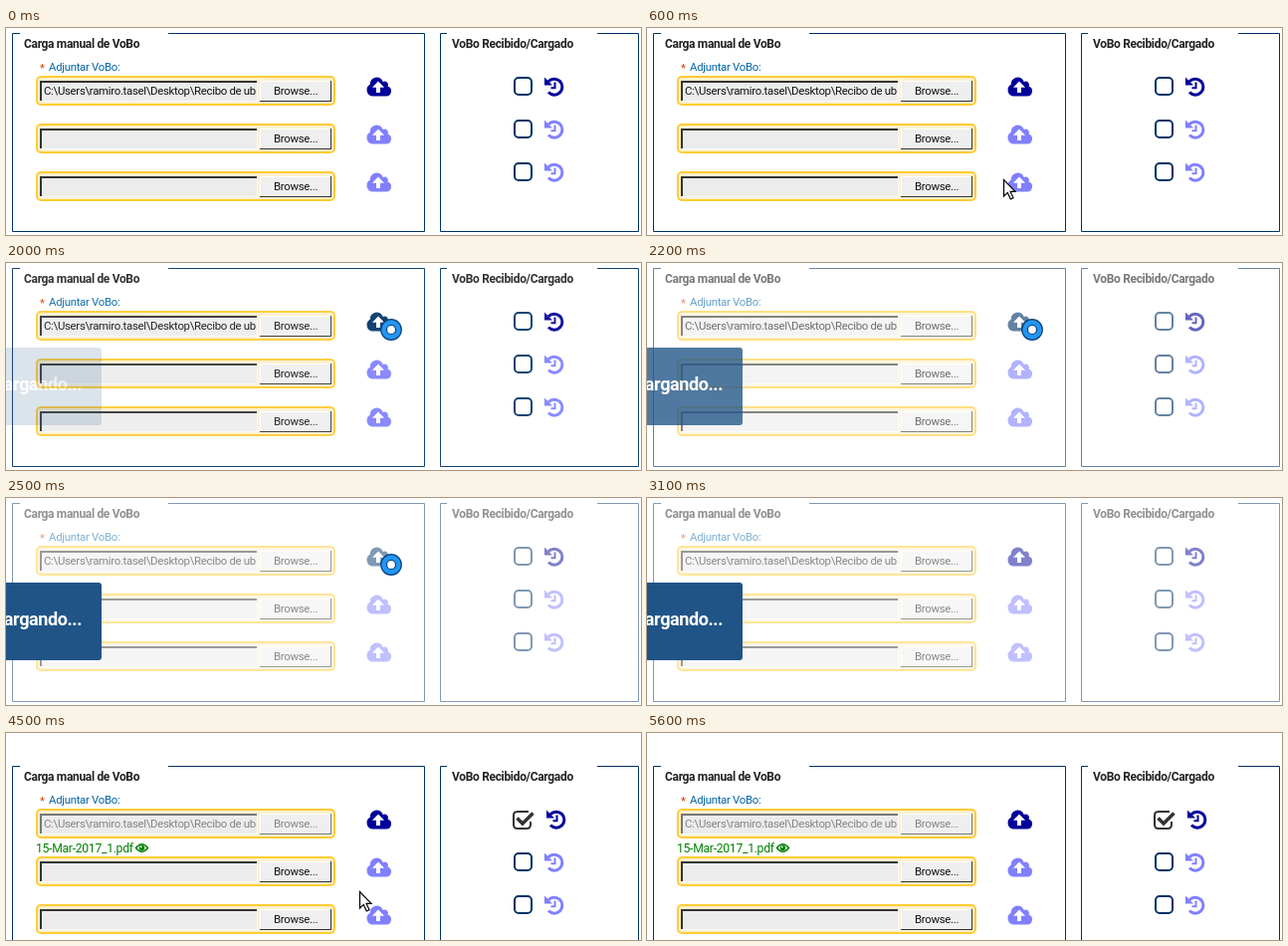
An HTML page for the animation above (5.7 s loop, 638 px wide and 208 px high).

```html
<!DOCTYPE html>
<html lang="es">
<head>
<meta charset="utf-8">
<style>
html, body { margin: 0; width: 100%; height: 100%; overflow: hidden; background: #fff; }
svg { display: block; }
text { font: 11.4px Roboto, sans-serif; letter-spacing: -.3px; }
.title { font-size: 12px; font-weight: bold; letter-spacing: -.33px; fill: #222; }
.file { font-size: 12.2px; fill: #008000; }
.busy { font-size: 18px; font-weight: bold; letter-spacing: -.4px; fill: #fff; }
</style>
</head>
<body>
<svg id="stage" width="638" height="208" viewBox="0 0 638 208"></svg>
<script>
const LOOP = 5700, NAVY = '#036', BLUE = '#000099', PALE = '#8080ff';
const FILE_PATH = String.raw`C:\Users\ramiro.tasel\Desktop\Recibo de ub`;
const stage = document.getElementById('stage');
const clamp = v => Math.max(0, Math.min(1, v));
const at = (x, y, body) => `<g transform="translate(${x} ${y})">${body}</g>`;
const path = (d, fill, stroke = 'none', width = 1) =>
  `<path d="${d}" fill="${fill}" stroke="${stroke}" stroke-width="${width}"/>`;
const rect = (x, y, w, h, fill, extra = '') =>
  `<rect x="${x}" y="${y}" width="${w}" height="${h}" fill="${fill}" ${extra}/>`;
const text = (x, y, str, attrs = '') => `<text x="${x}" y="${y}" ${attrs}>${str}</text>`;

// The top edge is open where the legend sits.
const panel = (left, right, gapStart, gapEnd, title, titleX) =>
  path(`M${gapStart} 5.5H${left}V204.5H${right}V5.5H${gapEnd}`, 'none', NAVY) +
  text(titleX, 20, title, 'class="title"');

function fileRow(y, value, disabled) {
  const ink = disabled ? '#858585' : '#111';
  const edge = disabled ? '#777' : '#333';
  return at(0, y,
    rect(31, 1, 299, 28, '#fdf0d0', 'rx="4" stroke="#fc3" stroke-width="2"') +
    rect(34, 5, 219, 21, '#fafafa') + rect(34, 5, 218, 20, edge) +
    rect(36, 7, 216, 18, '#ececec') +
    `<svg x="36" y="7" width="215" height="18">${text(2, 12, value, `fill="${ink}"`)}</svg>` +
    rect(255, 5, 72, 21, edge) + rect(255, 5, 71, 20, '#fff') +
    rect(256, 6, 70, 19, '#efefef') +
    text(269, 19, 'Browse...', `fill="${ink}"`));
}

const cloud = (y, color) => at(374, y,
  path('M-6 9.5A6.3 6.3 0 0 1-8.3-2.2A6.7 6.7 0 0 1 4.7-5A3.5 3.5 0 0 1 9.6-.4A5.1 5.1 0 0 1 7.6 9.5Z', color) +
  path('M0-5.5L6 .8H2V6H-2V.8H-6Z', '#fff'));

const history = (x, y, color) => at(x, y,
  path('M-6-5.3A8 8 0 1 1-6 5.6', 'none', color, 3) +
  path('M-10-9.5V-1.5H-2Z', color) +
  path('M.5-4.5V1.3H-3.5', 'none', color, 2));

const checkbox = (y, checked) => checked
  ? at(519, y,
      path('M6-8H-5Q-9-8-9-4V5Q-9 9-5 9H4Q8 9 8 5V2', 'none', '#333', 2) +
      path('M-5.5-1.5L0 4L10.5-6.5', 'none', '#333', 3.4))
  : rect(511, y - 9, 17, 17, 'none', `rx="4" stroke="${NAVY}" stroke-width="2"`);

const eye = at(136.5, 115.5,
  path('M-6 0Q0-7.5 6 0Q0 7.5-6 0Z', 'none', '#008000', 1.5) +
  '<circle r="2.8" fill="#008000"/><circle cx="-.8" cy="-1" r=".9" fill="#fff"/>');

function form(done, hover) {
  let out = panel(6.5, 420.5, 14, 163, 'Carga manual de VoBo', 18) +
    panel(436.5, 635.5, 443, 594, 'VoBo Recibido/Cargado', 448) +
    text(34, 44, '*', 'fill="#e23b00"') +
    text(43, 43, 'Adjuntar VoBo:', 'fill="#0064a6"');
  for (let i = 0; i < 3; i++) {
    const first = i === 0, color = first ? BLUE : PALE, y = 59 + 43 * i;
    out += fileRow(48 + 48 * i, first ? FILE_PATH : '', first && done) +
      cloud(59 + 48 * i, first && hover ? NAVY : color) +
      checkbox(y, first && done) +
      history(first && done ? 553 : 551, y, color);
  }
  return at(0, done ? 28 : 0, out) +
    (done ? text(30, 120, '15-Mar-2017_1.pdf', 'class="file"') + eye : '');
}

const ARROW = path('M.5.5V17L4.3 13.4L7.3 20L10 18.8L7.1 12.4H12Z', '#fff', '#000', 1.2);
const HAND = path('M-2 1Q0-2.5 2 1V9Q4 7 5.3 9.6Q7.3 8 8.3 10.7Q10.7 10 10.7 13V18L8.5 24H-1L-6 16Q-8 12.5-5.5 12L-2 14.5Z', '#fff', '#000', 1.3) +
  path('M2 9V13M5.3 10V13.5M8.3 11V14', 'none', '#000');
const RING = '<circle cx="17" cy="12" r="7.4" fill="#fff" stroke="#0b3f78" stroke-width="7"/>' +
  '<circle cx="17" cy="12" r="7.4" fill="none" stroke="#2196f3" stroke-width="4.6"/>';

// Each visit of the pointer: [time, x, y] points.
const VISITS = [
  [[100, 480, 205], [600, 358, 152], [1200, 358, 152], [1400, 370, 55], [2500, 370, 55], [2700, 395, 212]],
  [[4100, 350, 204], [4500, 355, 159], [4700, 362, 212]]
];

function pointer(t) {
  for (const visit of VISITS) {
    const i = visit.findIndex(p => p[0] > t);
    if (i < 1) continue;
    const [t0, x0, y0] = visit[i - 1], [t1, x1, y1] = visit[i];
    const k = (t - t0) / (t1 - t0);
    const shape = t >= 2000 && t < 2700 ? RING : t >= 1400 && t < 2000 ? HAND : ARROW;
    return at(x0 + (x1 - x0) * k, y0 + (y1 - y0) * k, shape);
  }
  return '';
}

function loading(t) {
  const shown = t < 3200 ? clamp((t - 1950) / 320) : t < 3300 ? 0.5 : 0;
  if (!shown) return '';
  return rect(0, 0, 638, 208, '#fff', `opacity="${shown / 2}"`) +
    `<g opacity="${shown}">${rect(-10, 85, 106, 78, '#205487', 'rx="3"')}` +
    text(76, 128, 'Cargando...', 'class="busy" text-anchor="end"') + '</g>';
}

let last = -1;
function draw(now) {
  const t = Math.floor(now % LOOP / 100) * 100;
  if (t !== last) {
    last = t;
    stage.innerHTML = form(t >= 3300, t >= 1400 && t < 2600) + loading(t) + pointer(t);
  }
  requestAnimationFrame(draw);
}
draw(performance.now());
</script>
</body>
</html>
```
